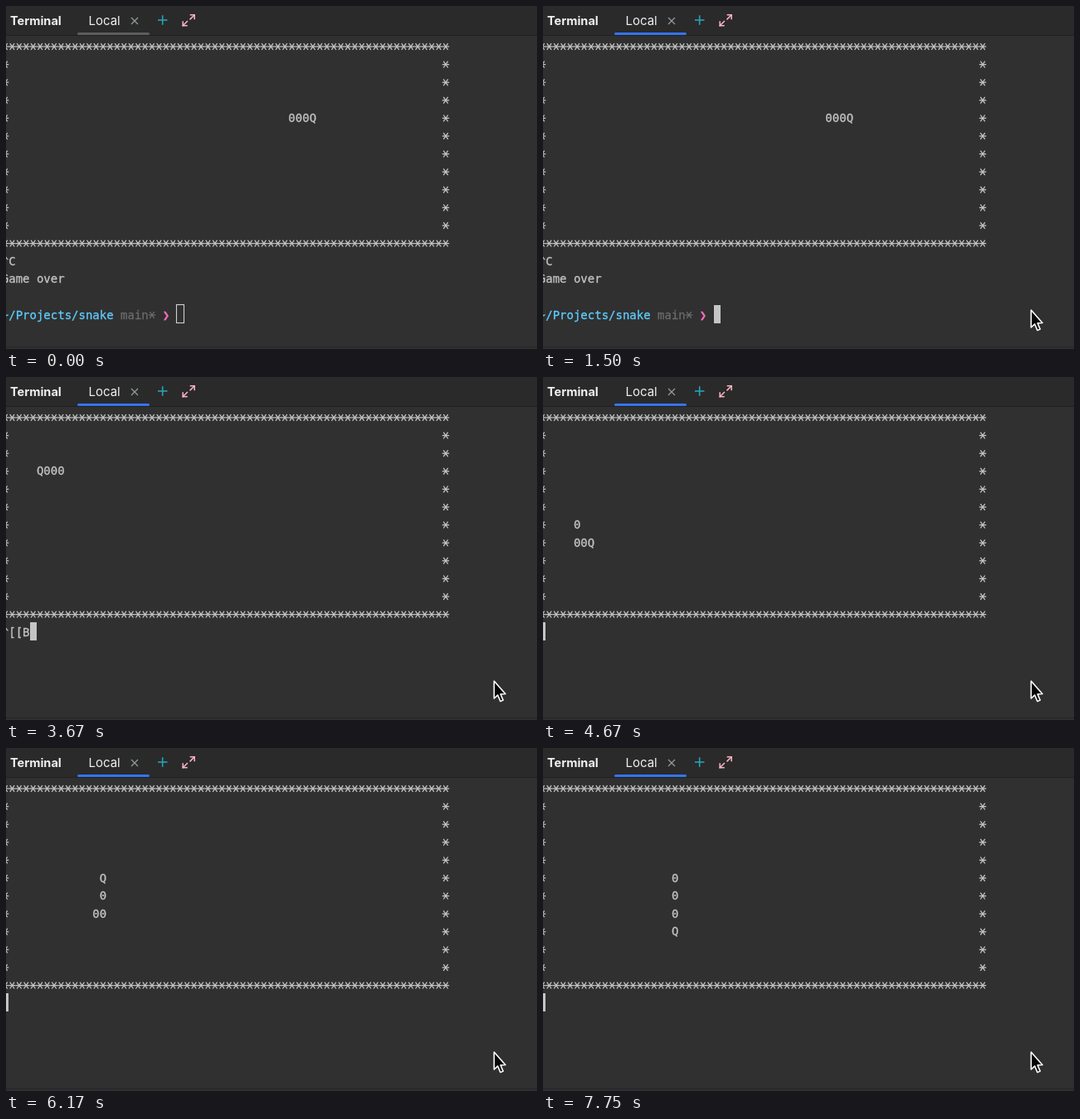
Animation, 640 px wide and 414 px high, one loop 8 s. Source, as an HTML page with a canvas:

```html
<!DOCTYPE html>
<html lang="en">
<head>
<meta charset="utf-8">
<title>Terminal snake</title>
<style>
  html, body { margin: 0; width: 100%; height: 100%; overflow: hidden; background: #303030; }
  canvas { display: block; }
</style>
</head>
<body>
<canvas id="stage" width="640" height="414"></canvas>
<script>
const ctx = document.getElementById('stage').getContext('2d');

const LOOP = 8000, LAST_CHANGE = 7750, FPS = 12;
const CELL = 8.428, LEFT = -5.2, ROW = 21.6, TOP = 49;
const COLS = 64, LAST_ROW = 11;
const BACK = '#303030', TEXT = '#c4c4c4', GREEN = '#8bd56c', GRAY = '#6b6b6b';

// Moments of the session, in ms
const APPEAR = 80, FOCUS = 1170, RECALL = 1750, ENTER = 2580, START = 2820;

// Snake: one step of the route per TICK, body trailing the head
const TICK = 160, FIRST_MOVE = 2200, LENGTH = 4;
const ORIGIN = { col: 14, row: 3 };
const ROUTE = 'L9 D4 R9 U3 R5 D5'.replace(/(\w)(\d)/g, (_, way, n) => way.repeat(n)).replace(/ /g, '');
const KEY = { U: 'A', D: 'B', R: 'C', L: 'D' };

const colX = c => LEFT + c * CELL;
const rowY = r => TOP + r * ROW;

function rect(x, y, w, h, color) {
  ctx.fillStyle = color;
  ctx.fillRect(x, y, w, h);
}

function line(color, width, x1, y1, x2, y2) {
  ctx.strokeStyle = color;
  ctx.lineWidth = width;
  ctx.beginPath();
  ctx.moveTo(x1, y1);
  ctx.lineTo(x2, y2);
  ctx.stroke();
}

function label(s, x, font) {
  ctx.font = font + ' Inter, sans-serif';
  ctx.fillStyle = '#f0f0f0';
  ctx.fillText(s, x, 23);
}

function print(s, col, row, color = TEXT) {
  const x = colX(col), y = rowY(row) + 4.6;
  ctx.font = '14px "DejaVu Sans Mono", monospace';
  ctx.fillStyle = ctx.strokeStyle = color;
  ctx.lineWidth = 0.3;
  ctx.fillText(s, x, y);
  ctx.strokeText(s, x, y);
}

function underline(col, count, row, color) {
  rect(colX(col), rowY(row) + 8, count * CELL, 1, color);
}

// Asterisk centred in its cell
function star(col, row, color = TEXT) {
  const x = colX(col) + CELL / 2, y = rowY(row);
  line(color, 1.3, x - 4.2, y, x + 4.2, y);
  for (const s of [-1, 1]) line(color, 1.3, x - 2.7, y - 3.9 * s, x + 2.7, y + 3.9 * s);
}

function cursor(col, row, filled) {
  const x = Math.round(colX(col) + 0.1), y = Math.round(rowY(row) - 12);
  if (filled) return rect(x, y, 8, 22, TEXT);
  ctx.strokeStyle = '#d0d0d0';
  ctx.lineWidth = 1.1;
  ctx.strokeRect(x - 0.5, y - 0.5, 9, 22);
}

function expandIcon(x, y, color) {
  for (const s of [-1, 1]) {
    const tipX = x + 7 * s, tipY = y - 6.5 * s;
    line(color, 1.5, tipX, tipY, tipX - 5.7 * s, tipY + 5.7 * s);
    line(color, 1.5, tipX + 0.7 * s, tipY, tipX - 5.5 * s, tipY);
    line(color, 1.5, tipX, tipY - 0.7 * s, tipX, tipY + 5.5 * s);
  }
}

function header(focused) {
  rect(0, 0, 640, 36, '#2a2a2a');
  rect(0, 35, 640, 1, '#202020');
  label('Terminal', 5, '700 14.5px');
  label('Local', 99.5, '400 15px');
  for (const s of [-4, 4]) line('#8f9a9c', 1.2, 155 - s, 14, 155 + s, 22);
  line('#27a3b7', 1.6, 183, 17, 194.5, 17);
  line('#27a3b7', 1.6, 188.7, 11.2, 188.7, 22.8);
  expandIcon(220.2, 17.2, '#ffb4c6');
  ctx.fillStyle = focused ? '#3574f0' : '#5d5d60';
  ctx.beginPath();
  ctx.roundRect(86, 32, 87, 3, 1.5);
  ctx.fill();
}

function border() {
  for (let c = 0; c < COLS; c++) {
    star(c, 0);
    star(c, LAST_ROW);
  }
  for (let r = 1; r < LAST_ROW; r++) {
    star(0, r);
    star(COLS - 1, r);
  }
}

function shell(t) {
  const recalled = t >= RECALL;
  print('000Q', 41, 4);
  print('^C', 0, 12);
  print('Game over', 0, 13);
  print('~/Projects/snake', 0, 15, '#5fcdff');
  print('main', 17, 15, GRAY);
  star(21, 15, GRAY);
  print('❯', 23, 15, '#ff6ac1');
  if (recalled) {
    print('sudo python', 25, 15, GREEN);
    print('./main.py', 37, 15);
    underline(25, 4, 15, GREEN);
    underline(37, 9, 15, TEXT);
  }
  if (t >= ENTER) cursor(0, 16, true);
  else cursor(recalled ? 46 : 25, 15, t >= FOCUS);
}

function cellAt(step) {
  const done = ROUTE.slice(0, Math.max(0, step));
  const count = way => done.split(way).length - 1;
  return {
    col: ORIGIN.col + count('R') - count('L') - Math.min(0, step),
    row: ORIGIN.row + count('D') - count('U')
  };
}

function game(t) {
  const moves = (t - FIRST_MOVE) / TICK, step = Math.floor(moves);
  for (let i = 0; i < LENGTH; i++) {
    const { col, row } = cellAt(step - i);
    print(i ? '0' : 'Q', col, row);
  }
  // The key pressed before a turn echoes until the next redraw
  const turning = ROUTE[step] !== ROUTE[step - 1] && moves - step > 0.1;
  const echo = turning ? '^[[' + KEY[ROUTE[step]] : '';
  print(echo, 0, 12);
  cursor(echo.length, 12, true);
}

function pointer(t) {
  if (t < APPEAR) return;
  const left = Math.max(0, 1 - (t - APPEAR) / 920) ** 2;
  ctx.save();
  ctx.translate(588.3 + 17 * left, 366.5 + 10 * left);
  ctx.scale(1.05, 1.05);
  const shape = new Path2D('M0 .5V20.5L4.2 16.6L7.2 23.8L10.4 22.5L7.4 15.5L13 15.3Z');
  ctx.lineJoin = 'round';
  ctx.fillStyle = '#050505';
  ctx.fill(shape);
  ctx.strokeStyle = '#fff';
  ctx.lineWidth = 1.5;
  ctx.stroke(shape);
  ctx.restore();
}

function draw(now) {
  const ms = Math.min(now % LOOP, LAST_CHANGE);
  const t = Math.floor((ms + 4) * FPS / 1000) * 1000 / FPS;
  rect(0, 0, 640, 414, BACK);
  rect(0, 411, 640, 1, '#262626');
  border();
  if (t < START) shell(t);
  else game(t);
  header(t >= FOCUS);
  pointer(t);
}

const begin = performance.now();
function loop() {
  draw(performance.now() - begin);
  requestAnimationFrame(loop);
}
loop();
</script>
</body>
</html>
```
